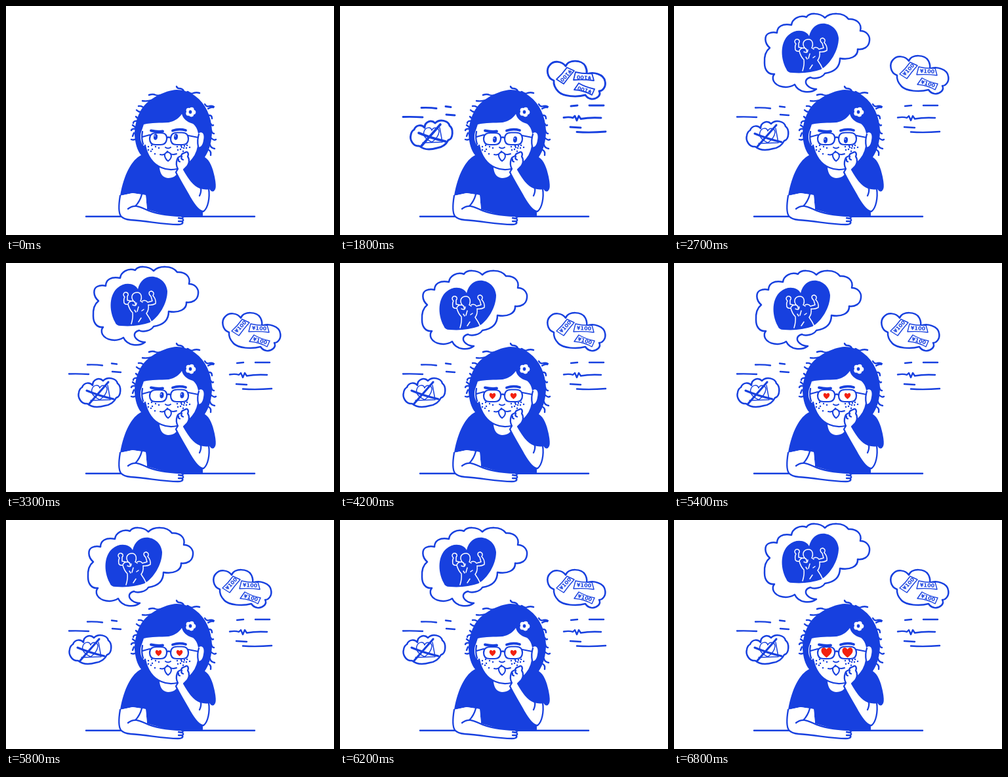
An HTML page with a canvas for the animation above (7 s loop, 500 by 350 pixels).

```html
<!DOCTYPE html>
<html lang="en">
<head>
<meta charset="utf-8">
<title>Daydream</title>
<style>
html, body { margin: 0; width: 100%; height: 100%; overflow: hidden; background: #fff; }
canvas { display: block; width: 500px; height: 350px; }
</style>
</head>
<body>
<canvas id="stage" width="500" height="350"></canvas>
<script>
const ctx = document.getElementById('stage').getContext('2d');
const BLUE = '#1740df', RED = '#f3210f', WHITE = '#fff';
const LOOP = 7000;
ctx.lineCap = ctx.lineJoin = 'round';

function fill(d, color = BLUE) {
  ctx.fillStyle = color;
  ctx.fill(new Path2D(d));
}
function line(d, width = 2.3, color = BLUE) {
  ctx.strokeStyle = color;
  ctx.lineWidth = width;
  ctx.stroke(new Path2D(d));
}
function shape(d, width = 2.3) {
  fill(d, WHITE);
  line(d, width);
}
function oval(x, y, rx, ry = rx, color = BLUE, turn = 0) {
  ctx.fillStyle = color;
  ctx.beginPath();
  ctx.ellipse(x, y, rx, ry, turn, 0, Math.PI * 2);
  ctx.fill();
}
function at(x, y, draw, turn = 0, scale = 1) {
  ctx.save();
  ctx.translate(x, y);
  ctx.rotate(turn);
  ctx.scale(scale, scale);
  draw();
  ctx.restore();
}

function drawHair() {
  line('M260 123q1 3 4 3q5 0 7 4M268 131q5 3 9 0q3 2 6 3q6 -3 12 -1' +
    'M218 136q6 -2 10 0q5 2 12 -1M208 145q7 1 14 -1M202 153q6 -1 9 4M199 159q4 4 9 3' +
    'M198 169q2 3 6 3M194 179q0 -4 7 -3M191 190q1 -3 7 -2M193 182l5 4M191 204q5 2 9 -3M195 194l-2 5' +
    'M303 150q3 5 7 3q5 -1 7 1M308 157q5 -3 8 -2M310 167q4 0 4 5M312 180q3 4 4 2M313 190q1 5 4 5' +
    'M313 202q4 4 7 2M311 212q1 5 7 6M309 220q4 2 3 8', 2.4);
  fill('M260 128C242 129 217 142 207 157C199 169 196 185 196 197C197 210 200 221 206 228' +
    'C192 235 180 256 174 290L193 286L213 289L215 311L250 321H300V312L309 278' +
    'Q315 288 319 280Q321 276 318 261C315 247 311 236 303 231C310 221 314 207 314 190' +
    'C313 168 304 149 289 138C280 131 269 128 260 128Z');
}

function drawFace() {
  fill('M234 247C235 257 239 262 247 263C255 263 260 259 262 254L260 245Z', WHITE);
  fill('M210 181C222 178 235 179 248 178C258 176 264 171 268 165C270 172 275 177 285 180' +
    'C290 184 292 189 293 195C300 190 303 197 301 205C300 213 296 217 293 215' +
    'C291 230 279 243 266 248Q250 253 237 247C223 241 215 228 212 214' +
    'C205 213 203 198 207 190Z', WHITE);
  line('M212 213C215 229 224 242 237 247Q248 252 261 249M294 196Q291 205 293 215Q291 229 279 240' +
    'M208 192Q206 202 209 211');
  for (let i = 0; i < 5; i++) {
    const a = -1.2 + i * Math.PI * 0.4;
    oval(281.5 + 4.2 * Math.cos(a), 162 + 4 * Math.sin(a), 3.6, 3.6, WHITE);
  }
  oval(281, 162, 2.3, 2.8);

  line('M221 190.500Q231 192.500 239 191.500', 3.9);
  line('M254 190.500Q264 187 274 190', 3.9);

  const dots = [217,215, 222,213, 228,215, 217,220, 223,219, 227,226, 221,222, 233,217,
    261,215, 267,214, 272,214, 266,219, 271,217, 276,213, 270,222, 280,216, 262,220, 275,217, 268,216];
  for (let i = 0; i < dots.length; i += 2) oval(dots[i], dots[i + 1], 1.25);

  line('M243 216Q247 219 251 216M235 227Q242 229 246 222Q251 229 260 226', 2);
  shape('M243 225C240 229 244 235 247 237C251 235 254 229 250 225Q247 222 243 225Z', 2);
}

function drawArms() {
  shape('M262 249C258 242 260 237 261 234C262 230 266 230 267 229C268 224 272 225 273 224' +
    'C277 221 279 226 277 230C280 234 280 242 274 247L271 250C279 264 286 274 296 278' +
    'Q303 280 309 279C311 293 308 309 301 314C294 314 287 304 280 292' +
    'C271 276 263 263 259 254Z');
  line('M263 234Q262 237 265 238M268 230Q266 234 270 235M297 278Q298 284 295 290');
  fill('M174 290L193 286L213 289L215 312C227 318 246 320 267 321L270 333L220 332L175 322Z', WHITE);
  line('M207 288Q204 299 197 306');
  line('M174 290C172 302 171 315 175 321Q179 326 190 327C218 329 240 334 262 334Q269 334 269 331' +
    'M186 310C195 303 202 306 211 310C227 318 246 320 267 321Q271 322 269 325L263 324' +
    'M269 325Q272 328 268 329L263 329M268 329Q271 331 268 333');
}

function heart(x, y, s) {
  at(x, y, () => fill('M0 5C-3 3 -6 0 -5 -3C-4 -6 -1 -5 0 -3C1 -5 4 -6 5 -3C6 0 3 3 0 5Z', RED), 0, s);
}

function drawEyes(step) {
  if (step >= 12) {
    const big = step % 2;
    for (const x of [232.5, 264.5]) heart(x, big ? 202.5 : 203.3, big ? 1.55 : 0.92);
  } else {
    const [x, y] = step === 0 || step === 2 || step === 3 ? [228, 200]
      : step === 4 || step === 5 ? [236, 204]
      : step >= 8 ? [237.5, 202] : [231, 205];
    for (const px of [x, x + 31]) {
      oval(px, y, 3, 4.7, BLUE, 0.1);
      oval(px - 1, y - 1.5, 0.7, 1, WHITE);
    }
  }
  line('M229 194H236C243 194 246 198 245 204C244 210 241 212 236 212H228C222 212 219 209 219 203C219 197 222 194 229 194Z' +
    'M261 193.500H268C275 193.500 278 197 278 203C278 209 275 212 269 212H260C254 212 251 209 251 203C251 197 254 193.500 261 193.500Z' +
    'M245 202Q248 199 251 202M219 197L208 200M278 198L293 201', 2.2);
}

function drawMotionLines(bold) {
  line('M124 155.500Q137 155 147 156.500M161 153.500L169 154.500M96 169.500Q111 169 126 170M162 166L175 167' +
    'M352 153L362 152M380 152L402 152M341 170.500Q350 169 355 171L358 168L361 175L364 168L367 172.500Q380 170 398 171' +
    'M351 185L367 186M361 192.500Q382 194 405 192', bold ? 2.9 : 2.4);
}

function drawLeftCloud(bold) {
  shape('M116 190C119 182 128 182 132 187C132 178 142 174 148 180C155 173 168 176 170 184' +
    'C176 188 176 204 168 206C164 214 158 217 151 218C141 221 131 221 124 215' +
    'C114 216 109 205 111 198Q112 192 116 190Z', bold ? 2.9 : 2.5);
  line('M143 209C134 205 129 199 131 193C133 186 141 185 143 191C146 185 154 187 154 193Q153 202 143 209' +
    'M155 187L159 209L129 210', 1.5);
  line('M123 195Q142 203 164 208M156 182Q142 198 127 215', bold ? 3.6 : 3.1);
}

function bill(d, x, y, turn, flip, bold) {
  shape(d, bold ? 1.8 : 1.4);
  at(x, y, () => {
    ctx.fillStyle = BLUE;
    ctx.font = 'bold 8px "DejaVu Sans", sans-serif';
    ctx.textAlign = 'center';
    ctx.textBaseline = 'middle';
    ctx.fillText('¥100', 0, 0);
  }, turn + (flip ? Math.PI : 0));
}

function drawRightCloud(bold) {
  shape('M340 106C329 102 328 88 334 82C340 75 352 76 358 84C362 73 383 74 388 84Q391 90 390 96' +
    'C400 92 416 96 418 107C420 116 414 122 409 122C413 129 404 135 397 134Q391 133 388 128' +
    'C374 132 354 130 347 123Q339 115 340 106Z', bold ? 2.9 : 2.5);
  bill('M344 104Q353 96 360 86L371 91Q363 100 355 111Z', 358, 98, -0.83, bold, bold);
  bill('M373 93Q386 96 398 95L401 106Q386 104 370 105Z', 386, 100.5, 0.05, bold, bold);
  bill('M378 110Q388 116 402 119L398 128Q386 121 371 120Z', 387, 119.5, 0.28, bold, bold);
}

function drawDream() {
  shape('M146 64C137 56 138 45 144 42Q150 39 157 41C157 32 165 26 179 29C180 20 191 13 202 17' +
    'C206 10 222 10 230 18C238 10 258 9 266 20C277 19 287 26 284 38' +
    'C293 38 299 45 298 53C297 63 289 67 280 66C281 77 268 83 253 80' +
    'C253 94 244 101 230 103C226 110 213 112 208 109' +
    'C198 112 200 119 205 123Q210 127 217 127C208 134 190 133 184 120' +
    'C173 127 157 124 152 115Q149 108 153 104C143 105 138 97 138 87Q137 71 146 64Z', 2.5);
  fill('M206 46C202 37 186 34 175 44C163 54 161 77 171 96Q173 102 180 102Q204 104 224 97' +
    'C238 89 251 68 251 49C249 24 213 16 206 46Z');
  line('M199 64C194 56 199 51 205 51C211 51 213 58 210 64M199 64Q203 66 202 69M210 64L213 66' +
    'M199 64Q192 64 191 69Q187 70 185 67Q184 61 186 58C182 54 185 50 189 51Q193 53 190 57L190 63L195 64' +
    'M213 64Q218 62 221 66L228 64L226 57C222 54 222 49 227 49Q232 51 229 56Q234 61 233 68Q228 71 222 70' +
    'M191 69Q193 77 198 82Q199 90 196 99M222 70Q223 78 219 83Q224 90 227 97' +
    'M198 70Q204 73 204 67M207 73L205 80M201 78L203 81M212 79L215 77M211 90L207 96', 1.5, WHITE);
}

function stepAt(t) {
  if (t < 1000) return Math.floor(t / 500);
  if (t < 1800) return 2 + Math.floor((t - 1000) / 400);
  if (t < 5400) return 4 + Math.floor((t - 1800) / 300);
  return 16 + Math.floor((t - 5400) / 200);
}

function render(step) {
  const even = step % 2 === 0;
  const early = step < 5;
  ctx.fillStyle = WHITE;
  ctx.fillRect(0, 0, 500, 350);

  if (step >= 1) drawMotionLines(early && even);
  if (step >= 3) {
    const [x, y] = early ? [-3, -1] : even ? [-14, 0] : [0, 0];
    at(x, y, () => drawLeftCloud(early));
  }
  if (step >= 4) {
    const x = step < 7 || even ? -14 : 0;
    at(x, step < 6 ? 8 : 0, () => drawRightCloud(step < 6));
  }
  if (step >= 5) {
    const x = even ? -13 : step > 8 && step < 15 ? -5 : 0;
    at(x, even || step < 9 ? 0 : -6, drawDream);
  }

  line('M122 321.700H379', 2.4);
  drawHair();
  drawFace();
  drawEyes(step);
  drawArms();
}

function tick(now) {
  render(stepAt(now % LOOP));
  requestAnimationFrame(tick);
}
render(0);
requestAnimationFrame(tick);
</script>
</body>
</html>
```
